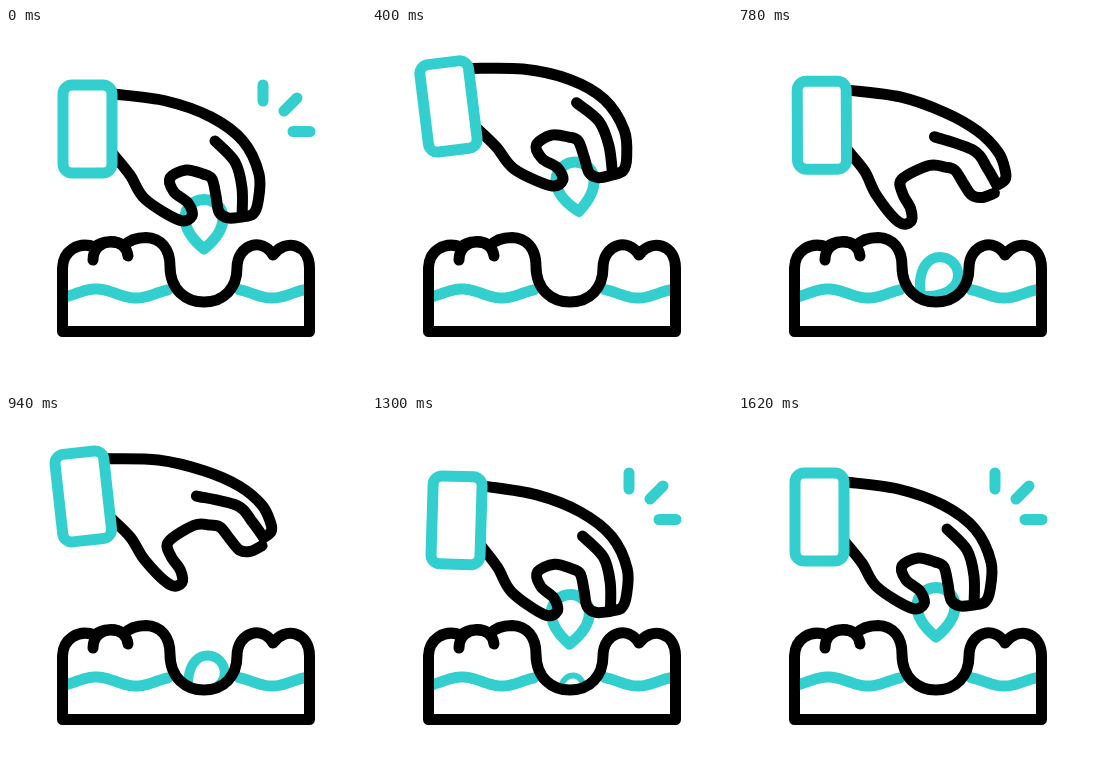
An HTML page that plays this animation: 360 by 360 pixels, repeating every 1980 ms.

```html
<!DOCTYPE html>
<html lang="en">
<head>
<meta charset="utf-8">
<title>Planting a seed</title>
<style>
  html, body { margin: 0; width: 100%; height: 100%; overflow: hidden; background: #fff; }
  svg { display: block; width: 100%; height: 100%; }
  g { fill: none; stroke: #000; stroke-width: 11; stroke-linecap: round; stroke-linejoin: round; }
  .teal { stroke: #33cfcf; }
</style>
</head>
<body>
<svg viewBox="0 0 360 360">
  <defs>
    <path id="seed" d="M0 31C-11 22-19 12-19 0A19 18.5 0 0 1 19 0C19 12 11 22 0 31Z"/>
    <path id="soil" d="M56.5 303.5V240C57 223 72 213 89 219C96 212 111 212 118 218
      C124 211 132 209.5 140 209.5C155 210 164 221 164 238C164 262 180 274 198 274
      C218 274 231 260 231 240C231 216 257 209 267 227C279 210 303.5 216 303.5 240V303.5Z"/>
  </defs>
  <g>
    <use id="fallen" class="teal" href="#seed"/>
    <use href="#soil" fill="#fff" stroke="none"/>
    <path id="water" class="teal"/>
    <use href="#soil"/>
    <path d="M87 232C87 221 95 214 105 214C115 214 121 220 122 228"/>
    <path id="sparks" class="teal"/>
    <g id="hand">
      <use id="held" class="teal" href="#seed"/>
      <path id="outline"/>
      <rect class="teal" x="57" y="57" width="49" height="88" rx="9"/>
    </g>
  </g>
</svg>
<script>
const LOOP = 1980, DROP = 440, LANDED = 620, GONE = 1580;
const $ = id => document.getElementById(id);
const place = (id, transform) => $(id).setAttribute('transform', transform);
const show = (id, on) => $(id).setAttribute('visibility', on ? 'visible' : 'hidden');

const progress = (t, from, to) => Math.min(1, Math.max(0, (t - from) / (to - from)));
const ramp = (t, from, to) => {
  const p = progress(t, from, to);
  return p * p * (3 - 2 * p);
};
// Rises over a..b and falls back over c..d
const pulse = (t, a, b, c, d) => ramp(t, a, b) - ramp(t, c, d);

// Key points of the closed hand
const wrist = [[108, 66], [160, 73]];
const index = [[205, 89], [237, 113], [253, 146], [252, 174], [247, 186], [236, 189]];
const crease = [[229, 134], [236, 160], [236, 189]];
const middle = [[236, 189], [222, 190], [213, 184], [210, 168], [206, 151], [197, 146], [180, 142]];
const thumb = [[164, 150], [168, 164], [182, 175], [186, 188], [173, 192], [139, 171], [124, 147]];

// Turns and shortens a finger about its joint, more towards the tip.
function swing(points, [jx, jy], reach, degrees, shrink) {
  return points.map(([x, y]) => {
    const length = Math.hypot(x - jx, y - jy);
    const weight = Math.min(1, length / reach);
    const angle = Math.atan2(y - jy, x - jx) + degrees * weight * Math.PI / 180;
    const size = length * (1 - shrink * weight);
    return [jx + size * Math.cos(angle), jy + size * Math.sin(angle)];
  });
}

// Smooth curve through all points
function spline(points) {
  const at = i => points[Math.min(points.length - 1, Math.max(0, i))];
  const handle = (i, sign) => at(i).map((v, k) => v + sign * (at(i + 1)[k] - at(i - 1)[k]) / 6);
  return 'M' + at(0) + points.slice(1).map((p, i) => `C${handle(i, 1)} ${handle(i + 1, -1)} ${p}`).join('');
}

function handPath(open) {
  const knuckle = index[0], thumbBase = thumb[thumb.length - 1];
  const bendIndex = points => swing(points, knuckle, 105, -18 * open, 0.15 * open);
  return spline([...wrist, ...bendIndex(index)]) +
    spline([[209 - 15 * open, 113], ...bendIndex(crease)]) +
    spline([...swing(middle, knuckle, 105, -14 * open, 0.1 * open),
      ...swing(thumb, thumbBase, 66, 14 * open, 0.08 * open), [107, 126]]);
}

// The water is a wave mirrored about the middle of the hole.
function waterPath() {
  const level = x => 265.5 - 4.5 * Math.cos((Math.abs(x - 198) - 28) * Math.PI / 40);
  let d = '';
  for (const start of [58, 233]) {
    for (let x = start; x <= start + 70; x += 2) d += (x === start ? 'M' : 'L') + x + ' ' + level(x);
    if (start === 58) for (let x = 130; x <= 163; x += 2) d += `L${x} ${level(x)}`;
  }
  return d;
}

function draw(t) {
  const up = pulse(t, 0, 360, 430, 615) + pulse(t, 620, 1000, 1090, 1315);
  const low = pulse(t, 430, 615, 620, 1000) + 0.45 * pulse(t, 1090, 1315, 1315, 1610);
  const open = pulse(t, 410, 600, 1060, 1350);
  place('hand', `translate(${81 - 5 * up + 7 * low} ${101 - 22.5 * up + 8 * low})
    rotate(${4 * low - 7 * up}) translate(-81 -101)`);
  $('outline').setAttribute('d', handPath(open));

  const grown = t < DROP ? 1 : ramp(t, 1060, 1235);
  show('held', grown > 0);
  place('held', `translate(198 ${190 + 4 * open}) scale(${grown})`);

  const fall = progress(t, DROP, LANDED), sink = progress(t, LANDED, GONE);
  const depth = 153 + 82 * fall + 38 * (1 - (1 - sink) ** 2);
  show('fallen', t >= DROP && t < GONE);
  place('fallen', `translate(${203 - 3 * sink} ${depth}) rotate(${47 * fall - 7 + 15 * sink})
    scale(${(1 - 0.05 * fall) * (1 - sink ** 2.5)})`);

  const spark = 1 - pulse(t, 40, 240, 1050, 1170);
  show('sparks', spark > 0);
  $('sparks').setAttribute('d',
    `M257 73v${-16 * spark}M278 83l${13 * spark} ${-13 * spark}M287 103.5h${17 * spark}`);
}

function frame() {
  draw(performance.now() % LOOP);
  requestAnimationFrame(frame);
}
$('water').setAttribute('d', waterPath());
frame();
</script>
</body>
</html>
```
